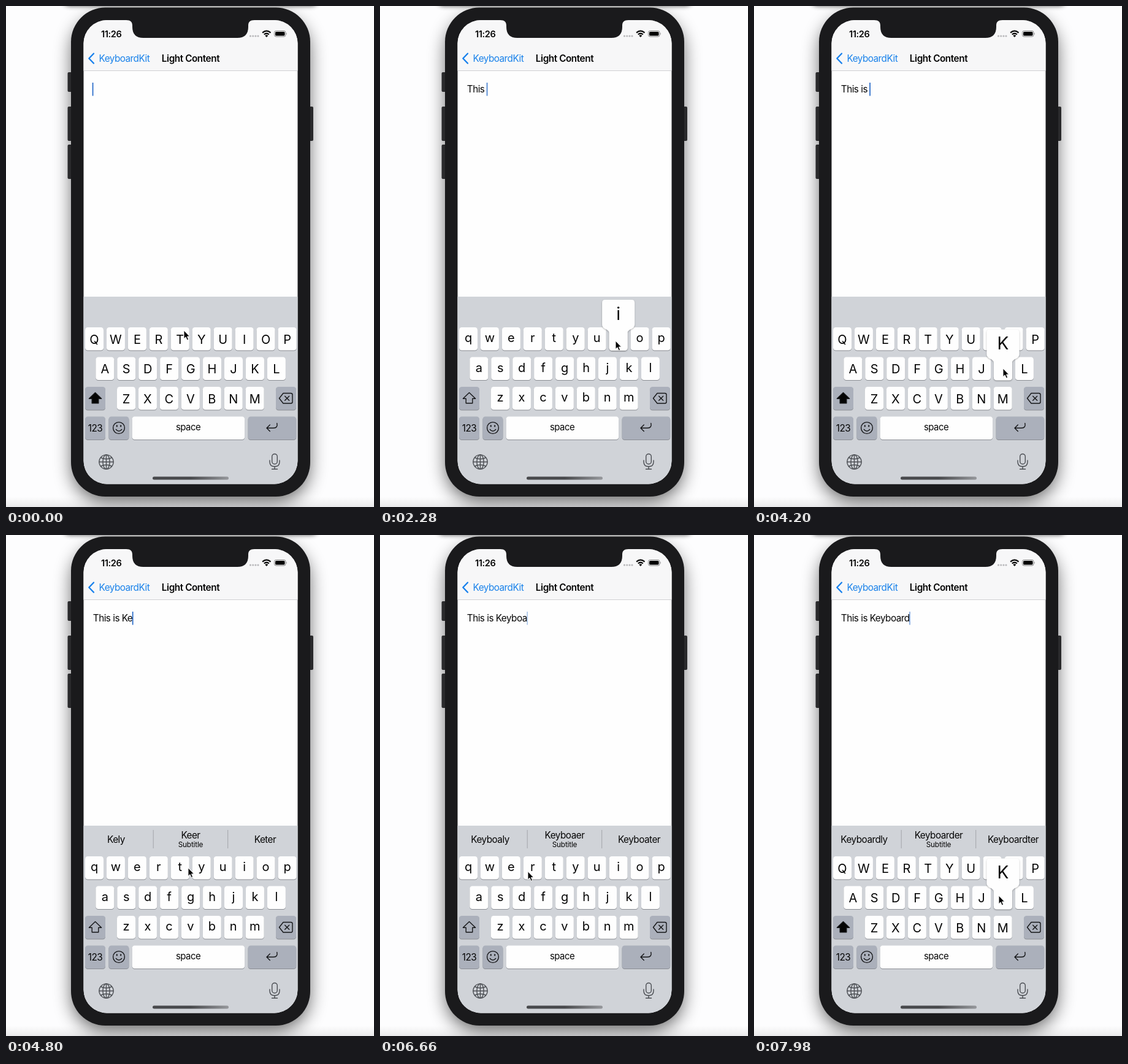
An HTML page for the animation above (8000 ms loop, 600x817 px).

```html
<!DOCTYPE html>
<html lang="en">
<head>
<meta charset="utf-8">
<title>Typing on a phone keyboard</title>
<style>
  html, body { margin: 0; width: 100%; height: 100%; overflow: hidden; background: #fdfdfe; }
  svg { display: block; width: 600px; height: 817px; }
  text { font: 15.3px Inter, sans-serif; letter-spacing: -.034em; white-space: pre; fill: #050505; }
  .mid { text-anchor: middle; }
  .bold { font-weight: 600; letter-spacing: -.028em; }
  .letter { font-size: 20px; letter-spacing: 0; }
  .big { font-size: 28px; letter-spacing: 0; }
  .small { font-size: 11.8px; letter-spacing: -.015em; }
  .line { fill: none; stroke: #151618; stroke-width: 1.4; stroke-linecap: round; stroke-linejoin: round; }
  .tool { stroke: #4b4e53; }
</style>
</head>
<body>
<svg viewBox="0 0 600 817">
  <defs>
    <filter id="wide" x="-30%" y="-20%" width="160%" height="140%"><feGaussianBlur stdDeviation="15"/></filter>
    <filter id="tight" x="-20%" y="-100%" width="140%" height="300%"><feGaussianBlur stdDeviation="4"/></filter>
    <filter id="lift" x="-30%" y="-20%" width="160%" height="150%">
      <feDropShadow dx="0" dy="1" stdDeviation="1.2" flood-color="#000" flood-opacity=".35"/>
    </filter>
    <linearGradient id="bar"><stop offset=".5" stop-color="#48494c"/><stop offset="1" stop-color="#96989c"/></linearGradient>
    <linearGradient id="floor" x2="0" y2="1"><stop stop-color="#eee" stop-opacity="0"/><stop offset="1" stop-color="#e9e9eb"/></linearGradient>
    <clipPath id="screen"><rect x="126.5" y="23" width="349" height="756.5" rx="38"/></clipPath>
  </defs>

  <rect width="600" height="817" fill="#fdfdfe"/>
  <rect y="800" width="600" height="17" fill="url(#floor)"/>
  <rect x="108" y="18" width="386" height="790" rx="55" opacity=".62" filter="url(#wide)"/>
  <rect x="95" y="-30" width="412" height="29" rx="8" opacity=".8" filter="url(#tight)"/>
  <g fill="#2a2a2c">
    <rect x="100.5" y="108" width="9" height="32" rx="2"/>
    <rect x="100.5" y="164" width="9" height="56" rx="2"/>
    <rect x="100.5" y="226" width="9" height="56" rx="2"/>
    <rect x="492" y="164" width="9" height="56" rx="2"/>
  </g>
  <rect x="106" y="2.5" width="390" height="797.5" rx="56" fill="#1a1a1c"/>

  <g clip-path="url(#screen)">
    <rect x="126" y="23" width="350" height="757" fill="#fefefe"/>
    <rect x="126" y="23" width="350" height="82" fill="#f7f7f8"/>
    <rect x="126" y="105" width="350" height="1" fill="#d0d0d3"/>
    <rect x="126" y="474" width="350" height="306" fill="#d0d3d8"/>
    <path d="M196 22V23C203 23 206 26 206 32V34Q206 52 224 52H377Q395 52 395 34V32C395 26 398 23 405 23V22Z" fill="#1a1a1c"/>
  </g>

  <text class="bold" x="155" y="50.5" style="font-size:14.6px">11:26</text>
  <g fill="#b9b9bc">
    <circle cx="398.5" cy="49" r="1.6"/><circle cx="402.7" cy="49" r="1.6"/>
    <circle cx="406.9" cy="49" r="1.6"/><circle cx="411" cy="49" r="1.6"/>
  </g>
  <g fill="none" stroke="#080808" stroke-width="2.2">
    <path d="M418.1 43.6Q424.8 37.6 431.5 43.6"/><path d="M420.8 46.5Q424.8 43 428.8 46.5"/>
  </g>
  <path d="M422.3 48.3Q424.8 46.4 427.3 48.3L424.8 51Z"/>
  <rect x="437.5" y="40.5" width="18.5" height="9.5" rx="2.8" fill="none" stroke="#888"/>
  <rect x="439" y="42" width="15.5" height="6.5" rx="1.5"/>
  <path d="M457.2 43.5Q459 45.2 457.2 47Z" fill="#888"/>

  <path d="M143 77.5L135.3 85.5L143 93.5" class="line" style="stroke:#157fec;stroke-width:2.3"/>
  <text x="151.5" y="90.5" style="fill:#1a82ea">KeyboardKit</text>
  <text class="mid bold" x="301" y="90.5">Light Content</text>

  <text id="typed" x="141.8" y="141"></text>
  <rect id="caret" y="125" width="1.7" height="21.5" fill="#2468c8"/>

  <g id="hints">
    <path d="M240.2 481V511M361.7 481V511" stroke="#a2a5aa"/>
    <text class="mid" x="179.5" y="502"></text>
    <text class="mid" x="301" y="495"></text>
    <text class="mid" x="422.5" y="502"></text>
    <text class="mid small" x="301" y="509.3">Subtitle</text>
  </g>
  <g id="keys"></g>

  <path id="arrow" class="line" d="M145.5 630.5L155.6 640.3H150.8V647.8H140.2V640.3H135.4Z"/>
  <path class="line" d="M452 631.5H464.5Q467 631.5 467 634V645.5Q467 648 464.5 648H452L445.5 639.7ZM454.7 636.2L461.7 643.2M461.7 636.2L454.7 643.2"/>
  <text class="mid" x="145.5" y="693.5">123</text>
  <g class="line">
    <circle cx="184" cy="688" r="9.4"/><path d="M179.3 690.5Q184 696 188.7 690.5"/>
    <path d="M180.8 684.3V685.6M187.2 684.3V685.6" stroke-width="2"/>
    <path d="M441.8 680.5Q443.5 688.2 436 688.2H425.5M430.3 683L425 688.2L430.3 693.4"/>
  </g>
  <text class="mid" x="297" y="692" style="font-size:14.9px">space</text>
  <g class="line tool">
    <circle cx="163.5" cy="743.5" r="11.6"/><ellipse cx="163.5" cy="743.5" rx="5.6" ry="11.6"/>
    <path d="M163.5 732V755M152 743.5H175M154.5 736.5Q163.5 741 172.5 736.5M154.5 750.5Q163.5 746 172.5 750.5"/>
    <rect x="433.7" y="730.5" width="8.6" height="16.5" rx="4.3"/>
    <path d="M430 741V743.5Q430 751 438 751Q446 751 446 743.5V741M438 751V755M433.5 755.3H442.5"/>
  </g>
  <rect x="239" y="767.5" width="124" height="5" rx="2.5" fill="url(#bar)"/>

  <g id="popup" filter="url(#lift)">
    <path fill="#fefefe" d="M0 33V9C0 2-11.5 4-11.5-5V-40Q-11.5-45-6.5-45H36.5Q41.5-45 41.5-40V-5C41.5 4 30 2 30 9V33Q30 38 25 38H5Q0 38 0 33Z"/>
    <text class="mid big" x="15" y="-12"></text>
  </g>
  <path id="pointer" d="M0 0V13.6L3.1 10.8L5.2 15.8L7.6 14.8L5.5 10H9.6Z" stroke="#fff" stroke-width="1" stroke-linejoin="round"/>
</svg>

<script>
const LOOP = 8000;
const START = { x: 290, y: 529, up: 0 };
// key, press time, release time, pointer tip
const taps = [
  ['t', 170, 290, 289, 533], ['h', 640, 760, 336, 586], ['i', 1010, 1140, 389, 535],
  ['s', 1500, 1600, 200, 588], [' ', 1850, 1950, 290, 684], ['i', 2220, 2340, 384, 546],
  ['s', 2700, 2800, 201, 589], [' ', 3120, 3220, 285, 684], ['shift', 3550, 3650, 150, 635],
  ['k', 4130, 4250, 406, 591], ['e', 4560, 4660, 214, 542], ['y', 4860, 4960, 319, 543],
  ['b', 5270, 5380, 339, 646], ['o', 5740, 5850, 422, 545], ['a', 6150, 6250, 162, 590],
  ['r', 6690, 6810, 242, 548], ['d', 7080, 7180, 231, 591], ['shift', 7440, 7540, 157, 634],
  ['k', 7960, 8090, 399, 588],
].map(([key, down, up, x, y]) => ({ key, down, up, x, y }));

const $ = id => document.getElementById(id);
const NS = 'http://www.w3.org/2000/svg';
function add(parent, tag, attrs) {
  const node = document.createElementNS(NS, tag);
  for (const name in attrs) node.setAttribute(name, attrs[name]);
  return parent.appendChild(node);
}

const LIGHT = '#fefefe', DARK = '#abb0bb';
const keys = {};
function addKey(name, x, y, width, fill) {
  const box = { x, width, height: 37.6, rx: 4.3 };
  add($('keys'), 'rect', { ...box, y: y + 1, fill: '#8b8e94' });
  keys[name] = { x, y, face: add($('keys'), 'rect', { ...box, y, fill }) };
}
[['qwertyuiop', 129, 524], ['asdfghjkl', 146.3, 572.4], ['zxcvbnm', 181, 620.9]].forEach(([row, left, y]) =>
  [...row].forEach((char, i) => {
    const x = left + 34.95 * i;
    addKey(char, x, y, 30, LIGHT);
    keys[char].label = add($('keys'), 'text', { class: 'mid letter', x: x + 15 });
  }));
addKey('shift', 129, 620.9, 33, DARK);
addKey('delete', 440, 620.9, 33, DARK);
addKey('123', 129, 669.4, 33, DARK);
addKey('emoji', 167.4, 669.4, 33, DARK);
addKey(' ', 205.6, 669.4, 183.6, LIGHT);
addKey('return', 394.6, 669.4, 78.6, DARK);

const ease = p => p * p * (3 - 2 * p);
const clamp = p => Math.max(0, Math.min(1, p));

function pointerAt(t) {
  const next = taps.findIndex(tap => t < tap.up);
  const to = taps[next], from = taps[next - 1] || START;
  const p = ease(clamp((t - from.up) / (to.down - from.up)));
  return [from.x + (to.x - from.x) * p, from.y + (to.y - from.y) * p];
}

function stateAt(t) {
  let text = '', upper = true, typedAt = -900;
  for (const { key, up } of taps) {
    if (up > t) break;
    if (key === 'shift') { upper = true; continue; }
    text += upper ? key.toUpperCase() : key;
    upper = false;
    typedAt = up;
  }
  const pressed = taps.find(tap => t >= tap.down && t < tap.up)?.key;
  return { text, upper, typedAt, pressed };
}

function caretOpacity(age) {
  const phase = age % 1000;
  return phase < 600 ? 1 - clamp((phase - 300) / 180) : clamp((phase - 700) / 180);
}

const hintLabels = $('hints').querySelectorAll('text');
const popupLabel = $('popup').querySelector('text');

function render(t) {
  const { text, upper, typedAt, pressed } = stateAt(t);
  const shown = char => upper ? char.toUpperCase() : char;

  $('typed').textContent = text;
  const end = text ? $('typed').getComputedTextLength() : -.6;
  $('caret').setAttribute('x', 141.3 + end);
  $('caret').setAttribute('opacity', caretOpacity(t - typedAt));

  const word = text.split(' ').pop();
  $('hints').style.display = word ? '' : 'none';
  ['ly', 'er', 'ter'].forEach((ending, i) => hintLabels[i].textContent = word + ending);

  for (const char in keys) {
    const { label, y } = keys[char];
    if (!label) continue;
    label.textContent = char === pressed ? '' : shown(char);
    label.setAttribute('y', y + (upper ? 26.6 : 24.4));
  }
  $('arrow').style.fill = upper ? '#050505' : 'none';
  keys.shift.face.setAttribute('fill', pressed === 'shift' ? LIGHT : DARK);
  keys[' '].face.setAttribute('fill', pressed === ' ' ? DARK : LIGHT);

  const held = keys[pressed];
  $('popup').style.display = held?.label ? '' : 'none';
  if (held?.label) {
    $('popup').setAttribute('transform', `translate(${held.x} ${held.y})`);
    popupLabel.textContent = shown(pressed);
  }
  $('pointer').setAttribute('transform', `translate(${pointerAt(t)})`);
}

const begin = performance.now();
function tick() {
  render((performance.now() - begin) % LOOP);
  requestAnimationFrame(tick);
}
tick();
</script>
</body>
</html>
```
